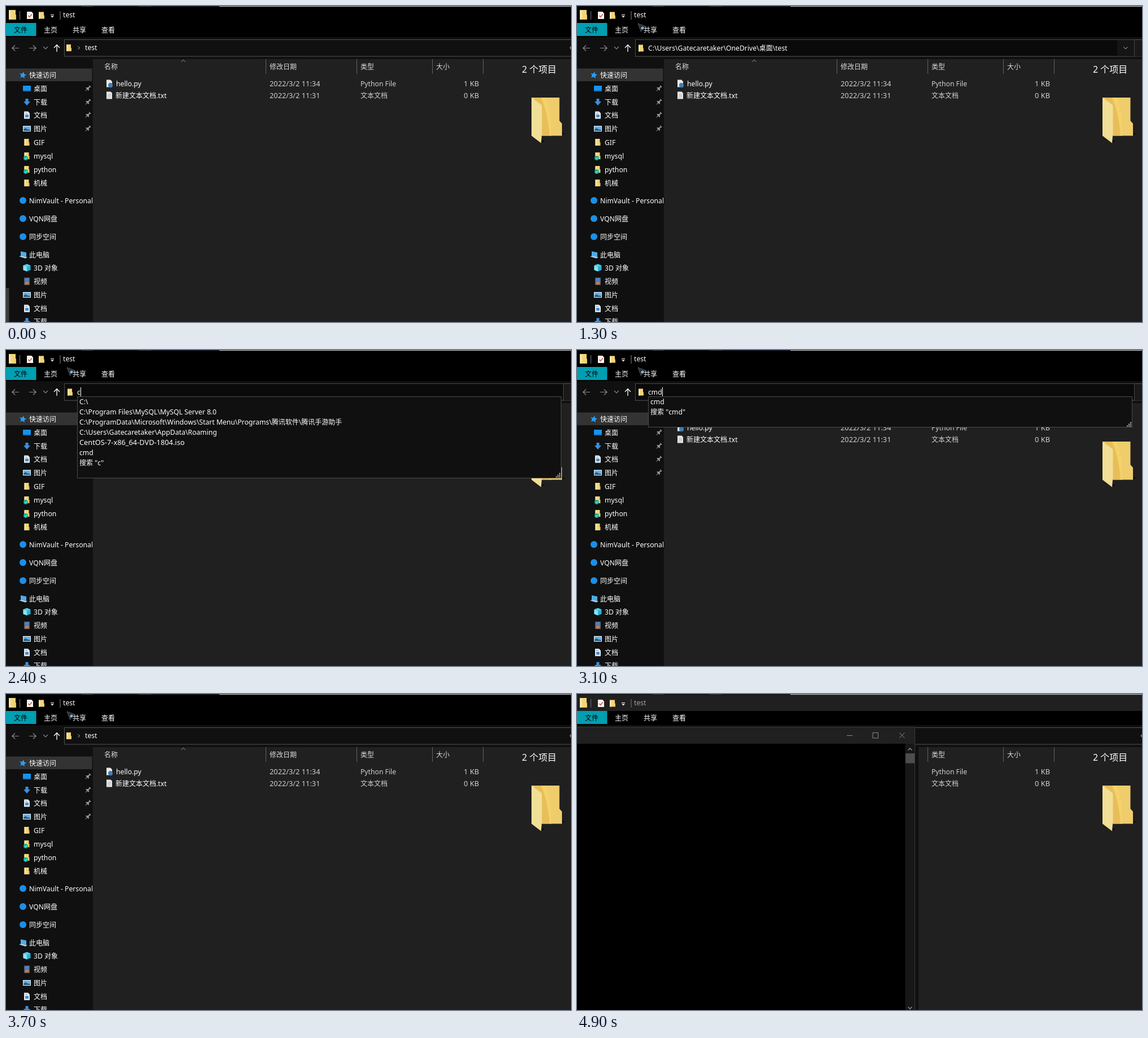
Write an HTML page that moves like this. It is 1001 px wide and 559 px high and loops after 6200 ms.

```html
<!DOCTYPE html>
<html lang="zh">
<head>
<meta charset="utf-8">
<title>Open a console from the address bar</title>
<style>
  html, body { margin: 0; width: 100%; height: 100%; overflow: hidden; background: #101010; }
  svg { display: block; width: 1001px; height: 559px; }
  text { font: 12.2px "Noto Sans", "Noto Sans CJK SC", "Noto Sans CJK", sans-serif; fill: #fff; white-space: pre; }
  .han { font-size: 12px; }
  .big, .big .han { font-size: 16px; }
  .num { font-size: 12.8px; }
  .line { fill: none; stroke: #fff; }
</style>
</head>
<body>
<svg id="stage" viewBox="0 0 1001 559">
  <defs>
    <clipPath id="sideClip"><rect y="90" width="153" height="469"/></clipPath>
  </defs>
</svg>
<script>
const LOOP = 6200;
const stage = document.getElementById('stage');
const HOME = String.raw`C:\Users\Gatecaretaker\OneDrive\桌面\test`;
const SHELL = String.raw`C:\Windows\System32\cmd.exe`;

// Chinese runs are set slightly smaller than Latin ones
const runs = s => s.replace(/[\u3400-\u9fff]+/g, '<tspan class="han">$&</tspan>');
const text = (x, y, s, color = '#fff', extra = '') =>
  `<text x="${x}" y="${y + 5}" style="fill:${color}" ${extra}>${runs(s)}</text>`;
const rect = (x, y, w, h, fill, extra = '') =>
  `<rect x="${x}" y="${y}" width="${w}" height="${h}" fill="${fill}" ${extra}/>`;
const path = (d, fill, extra = '') => `<path d="${d}" fill="${fill}" ${extra}/>`;
const line = (d, color, width = 1) =>
  `<path class="line" d="${d}" style="stroke:${color};stroke-width:${width}"/>`;
const dot = (x, y, r, fill) => `<circle cx="${x}" cy="${y}" r="${r}" fill="${fill}"/>`;
const group = (id, body, extra = '') => `<g id="${id}" ${extra}>${body}</g>`;

// Small icons, each centred on (x, y)
const folder = (x, y, w = 9, h = 12) =>
  rect(x - w / 2, y - h / 2, w - 1, h, '#f3d47a') +
  rect(x + w / 2 - 2, y, 2, h / 2, '#e9c767') +
  path(`M${x - w / 2} ${y - h / 2}l${w * .3} 2v${h - 2}h${-w * .3}z`, '#f8e6a4');
const icons = {
  folder,
  synced: (x, y) => folder(x, y) + dot(x - 2, y + 4, 4, '#0fae96') +
    line(`M${x - 4} ${y + 4}l1.6 1.6 2.8 -3`, '#fff'),
  star: (x, y) => path(`M${x} ${y - 6}l1.8 4 4.4 .4 -3.3 2.9 1 4.3 -3.9 -2.3 -3.9 2.3 1 -4.3 -3.3 -2.9 4.4 -.4z`,
    '#2f9df0', `transform="rotate(12 ${x} ${y})"`),
  desktop: (x, y) => rect(x - 7, y - 5, 14, 10, '#1594ec') + rect(x - 7, y + 3, 14, 2, '#0b74c7'),
  download: (x, y) => path(`M${x - 2.5} ${y - 6}h5v5h3.5l-6 7 -6 -7h3.5z`, '#3c8fe0'),
  document: (x, y) => path(`M${x - 5} ${y - 6.5}h7l3 3v10h-10z`, '#e9eef3') +
    rect(x - 3, y - 1, 6, 5, '#4b8fc9') + line(`M${x - 3} ${y - 3.5}h4`, '#7f9db5'),
  picture: (x, y) => rect(x - 7, y - 5, 14, 10, '#eef4f8') + rect(x - 6, y - 4, 12, 8, '#67b3e6') +
    path(`M${x - 6} ${y + 4}v-3l4 -2 3 2 5 1v2z`, '#2c5f86'),
  circle: (x, y) => dot(x, y, 6, '#1c8fe8'),
  computer: (x, y) => path(`M${x - 4} ${y - 6}l10 2v8l-10 -1.5z`, '#4aaeea') +
    path(`M${x - 7} ${y + 3}l4 -1 11 2.5 -4 2z`, '#b9cfdd'),
  cube: (x, y) => path(`M${x} ${y - 6.5}l6.5 2.5v8l-6.5 2.5 -6.5 -2.5v-8z`, '#23b3d8') +
    path(`M${x} ${y - 1.5}v8l-6.5 -2.5v-8z`, '#8fe1f0') +
    path(`M${x} ${y - 6.5}l6.5 2.5 -6.5 2.5 -6.5 -2.5z`, '#55cde6'),
  film: (x, y) => rect(x - 5, y - 6.5, 10, 13, '#59657a') + rect(x - 3, y - 5.5, 6, 5, '#4b83d6') +
    rect(x - 3, y + .5, 6, 5, '#c77e48'),
  page: (x, y) => path(`M${x - 5} ${y - 6.5}h7.5l2.5 2.5v10.5h-10z`, '#e6e6e6') +
    line(`M${x - 3} ${y - 2}h6m-6 2.5h6m-6 2.5h6`, '#b5b5b5'),
  script: (x, y) => path(`M${x - 5} ${y - 6.5}h7l3 3v10h-10z`, '#e9e9e9') + dot(x + 2, y + 3, 4, '#3d7fb8')
};
const pin = y => path(`M-2 -6h4v1l-1 .6v3l2.5 2v1.2h-3v4.2h-1v-4.2h-3v-1.2l2.5 -2v-3l-1 -.6z`, '#9a9a9a',
  `transform="translate(145 ${y}) rotate(45)"`);

const sidebar = [
  ['star', 122, '快速访问'], ['desktop', 146, '桌面', 1], ['download', 170, '下载', 1],
  ['document', 193, '文档', 1], ['picture', 217, '图片', 1], ['folder', 241, 'GIF', 1],
  ['synced', 265, 'mysql', 1], ['synced', 289, 'python', 1], ['folder', 313, '机械', 1],
  ['circle', 344, 'NimVault - Personal'], ['circle', 376, 'VQN网盘'], ['circle', 408, '同步空间'],
  ['computer', 440, '此电脑'], ['cube', 463, '3D 对象', 1], ['film', 487, '视频', 1],
  ['picture', 511, '图片', 1], ['document', 535, '文档', 1], ['download', 558, '下载', 1]
].map(([icon, y, label, child]) =>
  icons[icon](child ? 37 : 30, y) + text(child ? 49 : 41, y, label)).join('');

const row = (y, icon, name, time, type, size) =>
  icons[icon](183, y) + text(icon === 'script' ? 195 : 194, y, name) +
  text(467, y, time, '#d0d0d0', 'class="num"') + text(628, y, type, '#d0d0d0') +
  text(838, y, size, '#d0d0d0', 'class="num" text-anchor="end"');

const titleBar =
  rect(0, 0, 1001, 30, '#000', 'id="caption"') +
  rect(0, 0, 378, 1.5, '#0b1216') + rect(250, 0, 128, 1.5, '#17172b') +
  rect(134, 0, 20, 1, '#3a4044') + rect(235, 0, 22, 1, '#3a4044') + rect(378, 0, 623, 1.2, '#b9b9b9') +
  folder(11.5, 15.5, 13, 17) + line('M24.5 9v15M96 9v15', '#5a5a5a', 1.5) +
  path('M37 10h8l3 3v10h-11z', '#f4f4f4') + line('M39.5 17l2.2 2.6 4.2 -5', '#d4572c', 1.5) +
  folder(63, 16.5, 10, 12) + line('M79 15.5h6', '#fff') + path('M79 17.5h6l-3 3z', '#fff') +
  text(101, 15, 'test', '#fff', 'id="caption-text"');

const ribbon = rect(0, 30, 1001, 25, '#000') + rect(0, 30, 53.5, 23, '#009fb1') +
  text(14, 42, '文件', '#000') + text(67, 42, '主页') + text(118, 42, '共享') + text(169, 42, '查看');

const nav =
  line('M23 74.5h-12m5 -5l-5.2 5 5.2 5M41 74.5h12m-5 -5l5.2 5 -5.2 5M66 72l4 4 4 -4', '#8a8a8a', 1.2) +
  line('M90 81v-12m-5 5l5 -5.2 5 5.2', '#fff', 1.3) +
  rect(103.5, 59.5, 910, 29.5, '#101010', 'stroke="#535353"') +
  line('M1001 71.5l-2 2.5 2 2.5', '#ccc');
const crumb = folder(111.5, 74, 9, 12) + line('M127.5 71l3 3 -3 3', '#bbb') + text(140, 73, 'test');

const bigFolder =
  path('M931 162h49.5v41l4.500 5v21.500h-50z', '#efcd6d') +
  path('M935 162h13q13 24 16 67.500h-17z', '#e7be59') +
  path('M948 162h9q10 26 9 67.500h-3q-3 -40 -15 -67.500z', '#f3d26a') +
  path('M931 162l18.500 13.500v49l-1.500 18 -17 -13z', '#f2df96') +
  path('M949 238l6 1 -6 2zM986 225l5 1 -5 2z', '#080808');

const content = rect(154, 94, 847, 465, '#202020') +
  line('M460.5 94v26M621.5 94v26M755.5 94v26M845.5 94v26', '#636363') + line('M310.5 98.5l3.5 -3 3.5 3', '#999') +
  [[174, '名称'], [467, '修改日期'], [628, '类型'], [762, '大小']].map(([x, s]) => text(x, 107, s, '#dcdcdc')).join('') +
  rect(171, 126, 670.5, 22, '#414141', 'id="hover"') +
  row(137, 'script', 'hello.py', '2022/3/2 11:34', 'Python File', '1 KB') +
  row(158, 'page', '新建文本文档.txt', '2022/3/2 11:31', '文本文档', '0 KB') +
  text(914, 113, '2 个项目', '#fff', 'class="big"') + bigFolder;

const edit =
  rect(988, 60, 13, 29, '#191919') + rect(103.5, 59.5, 884, 29.5, '#0a0a0a', 'stroke="#484848"') +
  group('settling', rect(957, 60, 30, 28.5, '#151515') + line('M968.5 72.5l3.5 3.5 3.5 -3.5', '#bbb')) +
  folder(113.5, 74.5, 9, 12) + rect(126, 66, 243, 16, '#0078d7', 'id="selection"') +
  text(126, 74, '', '#fff', 'id="address"') + rect(126, 66, 1, 16, '#fff', 'id="caret"');

const list = (id, items) => {
  const end = 82.5 + 18 * (items.length + 1);
  let grip = '';
  for (let i = 0; i < 3; i++)
    for (let j = 0; j <= i; j++) grip += rect(980 - 3 * j, end - 9 + 3 * i, 2, 2, '#bbb');
  return group(id, rect(126.5, 82.5, 857, end - 82.5, '#101010', 'stroke="#4c4c4c"') + grip +
    items.map((s, i) => text(130, 91 + 18 * i, s, '#fff', /CentOS/.test(s) ? 'class="num"' : '')).join(''));
};
const wide = list('wide', [
  'C:\\', String.raw`C:\Program Files\MySQL\MySQL Server 8.0`,
  String.raw`C:\ProgramData\Microsoft\Windows\Start Menu\Programs\腾讯软件\腾讯手游助手`,
  String.raw`C:\Users\Gatecaretaker\AppData\Roaming`,
  'CentOS-7-x86_64-DVD-1804.iso', 'cmd', '搜索 "c"'
]);

const terminal = rect(599, 94, 11, 465, '#101010', 'id="edge"') + rect(0, 58, 599, 501, '#000') +
  rect(0, 59, 599, 29, '#202020', 'id="inactive"') + line('M0 58.5h598.5v501', '#3a3a3a') +
  group('buttons', line('M478 73.5h10M524 68.5h9.5v9.5h-9.5zM571 68.5l9.5 9.5m0 -9.5l-9.5 9.5', 'currentColor')) +
  rect(581.5, 88, 16.5, 471, '#171717') + rect(582, 105, 16, 17.5, '#4d4d4d') +
  line('M586.5 99.5l3.5 -3.5 3.5 3.5M586.5 553.5l3.5 3.5 3.5 -3.5', '#8c8c8c', 1.5);

const pointer = path('M0 0l14.5 5.5 -6 2.5 -3 6.5z', '#2e2e2e', 'stroke="#575757"') + dot(8, 8, 2.5, '#6cbcf0');

stage.insertAdjacentHTML('beforeend',
  rect(0, 0, 1001, 559, '#101010') + titleBar + ribbon + nav + group('crumb', crumb) +
  rect(0, 110.5, 152.5, 22.5, '#333') + group('side', sidebar, 'clip-path="url(#sideClip)"') +
  [146, 170, 193, 217].map(pin).join('') + rect(0, 499, 5.5, 60, '#3a3a3a', 'id="stub"') + content +
  group('edit', edit) + wide + list('short', ['cmd', '']) +
  text(130, 109, '', '#fff', 'id="search"') + group('terminal', terminal) + group('pointer', pointer));

const $ = id => document.getElementById(id);
const show = (id, on) => { $(id).style.visibility = on ? 'inherit' : 'hidden'; };
const latest = (steps, t) => steps.filter(s => s[0] <= t).pop();

const typed = [[0, HOME], [1900, ''], [2300, 'c'], [2500, 'cm'], [2800, 'cmd'], [3600, SHELL]];
const moves = [
  [400, 934, 521], [500, 690, 335], [600, 340, 139], [700, 107, 44], [800, 107, 36], [900, 108, 31],
  [4200, 96, 62], [4300, 62, 136], [4400, 31, 208], [4500]
];
let shown = '';

function draw(t) {
  const during = (from, to) => t >= from && t < to;
  const value = latest(typed, t)[1];
  const at = latest(moves, t);
  const open = t >= 3800;

  show('stub', t < 100);
  show('hover', during(600, 800));
  show('crumb', !during(1300, 3700));
  show('edit', during(1300, 3700));
  show('settling', during(1300, 1400));
  show('selection', during(1400, 1900));
  show('caret', during(1900, 3300) || during(3600, 3700));
  show('wide', during(2400, 2500));
  show('short', during(2500, 3500));
  show('search', during(2500, 3500));
  show('terminal', open);
  show('inactive', t >= 4900);

  // Visibility of parts inside the address editor follows the editor itself
  $('edit').style.display = during(1300, 3700) ? '' : 'none';

  if (value !== shown) {
    shown = value;
    $('address').innerHTML = runs(value);
    $('search').innerHTML = runs(`搜索 "${value}"`);
    const width = $('edit').style.display ? 0 : $('address').getComputedTextLength();
    $('caret').setAttribute('x', 126 + (value === SHELL ? 0 : Math.round(width)));
  }

  $('caption').setAttribute('fill', open ? '#202020' : '#000');
  $('caption-text').style.fill = open ? '#a0a0a0' : '#fff';
  $('buttons').style.color = t < 4900 ? '#fff' : '#8a8a8a';
  $('edge').setAttribute('width', t < 4900 ? 11 : 6);
  // The console grows and fades in over its first step
  const opening = t < 3900;
  $('terminal').style.opacity = opening ? .7 : 1;
  $('terminal').setAttribute('transform', opening ? 'translate(300 350) scale(.96) translate(-300 -350)' : '');

  const visible = at && at.length > 1;
  show('pointer', visible);
  if (visible) $('pointer').setAttribute('transform', `translate(${at[1]} ${at[2]})`);
}

const start = performance.now();
function tick() {
  draw((performance.now() - start) % LOOP);
  requestAnimationFrame(tick);
}
tick();
</script>
</body>
</html>
```
